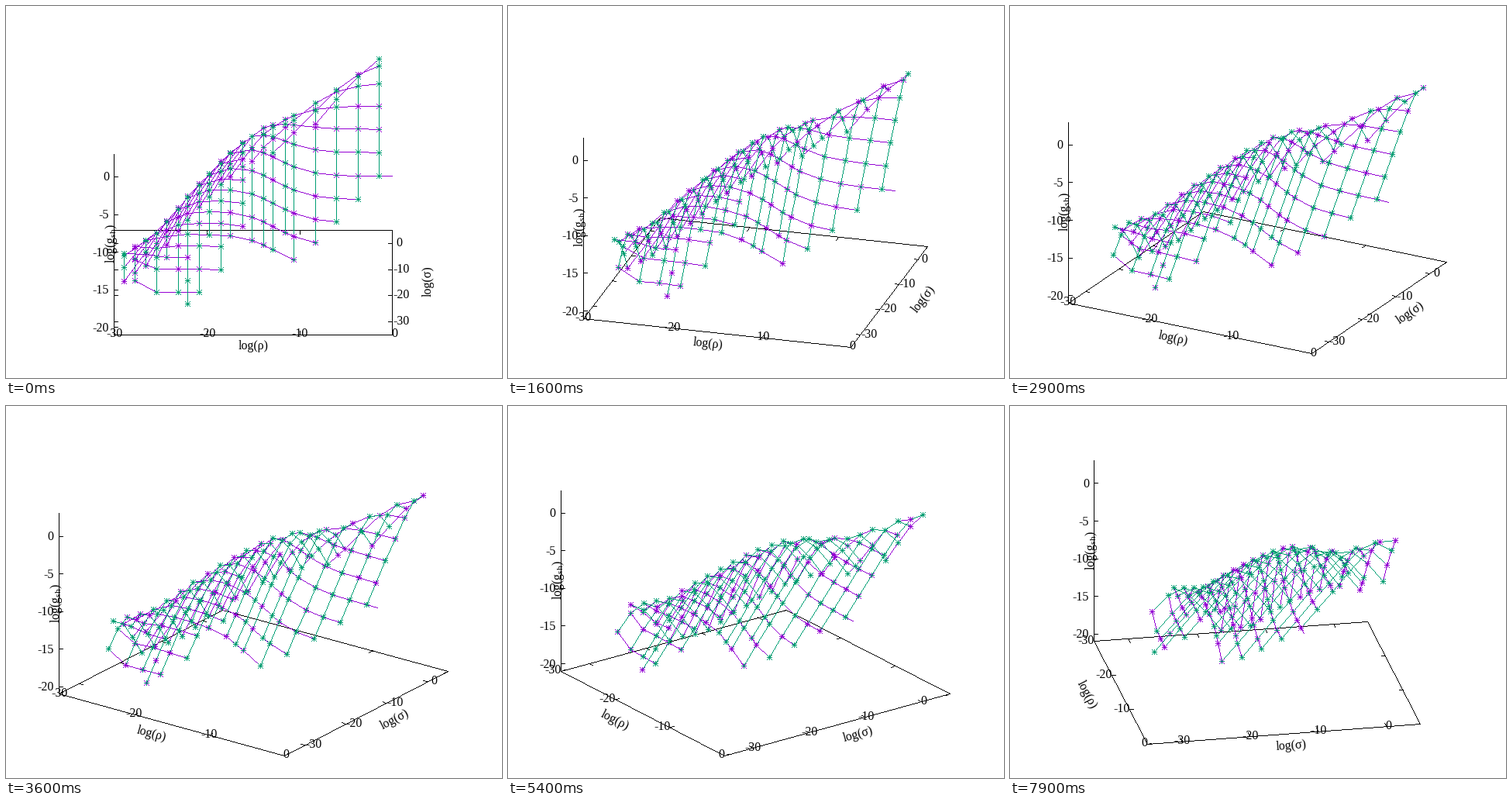
These frames come from a looping animation (640x480 px, 8 s). A matplotlib script:

```python
import matplotlib.pyplot as plt
import numpy as np
from matplotlib.animation import FuncAnimation

plt.rcParams.update({
    "font.family": "Liberation Serif",
    "mathtext.fontset": "custom",
    "mathtext.rm": "Liberation Serif",
})

W, H, DPI = 640, 480, 100
FRAMES, INTERVAL = 80, 100
FONT = 16 * 72 / DPI
CX, CY = 319.4, 357.1              # middle of the base plane
SX, SY, SZ = 179.5, 67.3, 9.71     # pixels per model unit
FLOOR, CEIL = -21, 3
PURPLE, GREEN, BLACK = (148, 0, 211), (0, 158, 115), (0, 0, 0)

ARM = np.arange(-3, 4)
PLUS = np.array([(d, 0) for d in ARM] + [(0, d) for d in ARM])
CROSS = np.array([(d, d) for d in ARM] + [(d, -d) for d in ARM])
STAR = np.concatenate([PLUS, CROSS])


def gain(rho):
    step = 4.7 / (1 + np.exp((rho + 12.5) / 1.8))
    return 4.3 + step + 0.75 * max(0, -25.6 - rho)


def loss(rho, sigma):
    knee = 1.77 + 0.581 * rho - 0.01017 * rho ** 2
    return 3 * np.log1p(np.exp(2.2 * (sigma - knee) / 3))


def column_specs():
    """(x, last row) of two interleaved sets of columns."""
    for i in range(13):
        deep = 2 if i == 9 else 0
        yield (162 - 27.4 * i) / SX, min(6 + i, 10) + i // 9 + deep
    for j in range(8):
        yield (41.2 - 27.7 * j) / SX, 9 + j if j < 2 else min(5.5 + 2 * j, 12.5)


def build_surface():
    """Points, and index chains of equal sigma (rows) and equal rho (columns)."""
    pts, rows, cols = [], {}, []
    for x, last in sorted(column_specs()):
        rho = 15 * x - 15
        col = []
        for k in np.arange(last % 1, last + 0.1):
            y = 0.835 - np.log(10) / 20 * k
            sigma = 20 * y - 15
            drop = loss(rho, sigma)
            if drop < 15.9:
                rows.setdefault(k, []).append(len(pts))
                col.append(len(pts))
                pts.append((x, y, sigma + gain(rho) - drop))
        cols.append(col)
    return np.array(pts), list(rows.values()), cols


POINTS, ROWS, COLS = build_surface()
LAST = COLS[-1][-1]                # its row runs on to the border
BORDER = (1, *POINTS[LAST, 1:])


def project(p, a):
    x, y, z = np.moveaxis(np.asarray(p, float), -1, 0)
    c, s = np.cos(a), np.sin(a)
    return np.stack([CX + SX * (x * c + y * s),
                     CY + SY * (x * s - y * c) - SZ * (z - FLOOR)], -1)


fig = plt.figure(figsize=(W / DPI, H / DPI), dpi=DPI, facecolor="white")
ax = fig.add_axes([0, 0, 1, 1])
ax.axis("off")
canvas = np.full((H, W, 3), 255, np.uint8)
image = ax.imshow(canvas, extent=(0, W, H, 0), aspect="auto", interpolation="nearest")


def dots(p, color):
    x, y = np.floor(p).astype(int).reshape(-1, 2).T
    canvas[y.clip(0, H - 1), x.clip(0, W - 1)] = color


def polyline(p, color):
    """Crisp one-pixel line without smoothing."""
    p = np.floor(p)
    for start, end in zip(p[:-1], p[1:]):
        n = int(np.abs(end - start).max()) + 1
        dots(np.linspace(start, end, n) + 0.5, color)


def marks(p, shape, color):
    dots(np.floor(p)[:, None] + shape, color)


def text(pos, s, **kw):
    ax.text(*pos, s, fontsize=FONT, **kw)


def tick_label(pos, value, ha, dx, dy):
    pad = {"left": 4, "center": 2, "right": 0}[ha] if value == 0 else 0
    text(pos + [dx + pad, dy], f"{value:d}", ha=ha, va="baseline")


def axis_label(pos, s, direction):
    angle = -np.degrees(np.arctan2(direction[1], direction[0]))
    text(pos, s, rotation=angle, rotation_mode="anchor", ha="center", va="center")


def draw_axes(a):
    c, s = np.cos(a), np.sin(a)
    corners = [(-1, -1), (1, -1), (1, 1), (-1, 1), (-1, -1)]
    base = project([(*xy, FLOOR) for xy in corners], a)
    top = project((-1, -1, CEIL), a)
    polyline(base, BLACK)
    polyline([base[0], top], BLACK)

    along_x, along_y = np.array([SX * c, SY * s]), np.array([SX * s, -SY * c])
    ux, uy = (v / np.hypot(*v) for v in (along_x, along_y))

    def ticks(near, far, u):
        polyline([near, near + 5 * u], BLACK)
        polyline([far, far - 5 * u], BLACK)

    for v in range(-30, 1, 10):
        x = (v + 15) / 15
        near, far = project([(x, -1, FLOOR), (x, 1, FLOOR)], a)
        ticks(near, far, uy)
        tick_label(near, v, "right" if uy[0] > 0.9 else "center", 0, 3)

        y = (v + 15) / 20
        near, far = project([(1, y, FLOOR), (-1, y, FLOOR)], a)
        ticks(near, far, -ux)
        tick_label(near, v, "left" if ux[0] > 0.9 else "center", 0.5, 3.5)

    for v in range(-20, 1, 5):
        p = project((-1, -1, v), a)
        polyline([p, p + [5, 0]], BLACK)
        tick_label(p, v, "right", -7, 5)

    axis_label((base[0] + base[1]) / 2 + [-45 * s, 15 * c], "log(ρ)", along_x)
    axis_label((base[1] + base[2]) / 2 + [46 * c, 18 * s - 2], "log(σ)", along_y)
    axis_label((base[0] + top) / 2 + [-4, -1], r"log(g$_{\mathrm{sh}}$)", (0, -1))


def draw_surface(a, seed):
    p = project(POINTS, a)
    for row in ROWS:
        polyline(p[row], PURPLE)
    polyline([p[LAST], project(BORDER, a)], PURPLE)
    for col in COLS:
        polyline(p[col], GREEN)

    # overlapping marks of both colours shimmer as the view turns
    mix = np.random.default_rng(seed).random(len(p))
    marks(p, STAR, PURPLE)
    marks(p[mix < 0.5], STAR, GREEN)
    marks(p[mix > 0.75], PLUS, GREEN)


def draw(i):
    a = np.radians(i)
    canvas[:] = 255
    for label in list(ax.texts):
        label.remove()
    draw_axes(a)
    draw_surface(a, i)
    image.set_data(canvas)
    return []


anim = FuncAnimation(fig, draw, frames=FRAMES, interval=INTERVAL,
                     init_func=lambda: [], repeat=True, repeat_delay=0)
plt.show()
```
